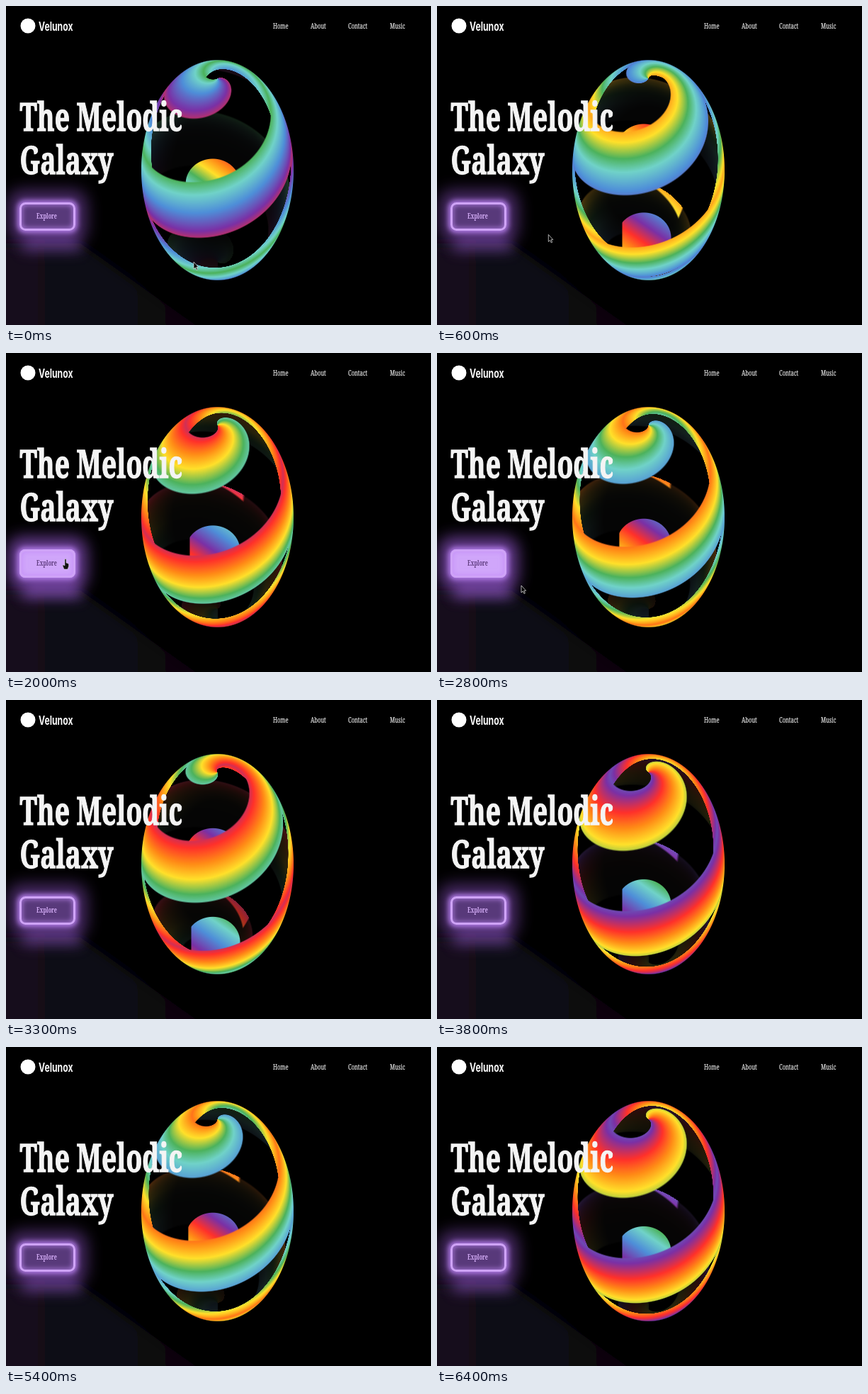
Animation of 600 by 450 pixels, one loop 6.5 s. Source, as an HTML page with a canvas:

```html
<!DOCTYPE html>
<html lang="en">
<head>
<meta charset="utf-8">
<title>Velunox</title>
<style>
  html, body { margin: 0; width: 100%; height: 100%; overflow: hidden; background: #000; }
  canvas, svg { position: absolute; left: 0; top: 0; width: 100%; height: 100%; display: block; }
  .serif { font-family: "Noto Serif", serif; }
  .title { font-size: 54px; font-weight: 700; fill: #f4f4f4; stroke: #f4f4f4; stroke-width: 1.4px; }
  .nav { font-size: 10.5px; font-weight: 500; fill: #e4e4e4; stroke: #e4e4e4; stroke-width: .25px; }
  .brand { font: 700 17px Inter, sans-serif; fill: #fafafa; }
  .explore { font-size: 10.5px; font-weight: 700; }
</style>
</head>
<body>
<canvas id="stage" width="600" height="450"></canvas>
<svg viewBox="0 0 600 450" preserveAspectRatio="none">
  <defs>
    <filter id="soft" x="-60%" y="-100%" width="220%" height="300%"><feGaussianBlur stdDeviation="3.5"/></filter>
    <filter id="wide" x="-80%" y="-150%" width="260%" height="400%"><feGaussianBlur stdDeviation="11"/></filter>
    <filter id="pool" x="-60%" y="-150%" width="220%" height="400%"><feGaussianBlur stdDeviation="9"/></filter>
    <linearGradient id="floor" x1="0" y1="0" x2="1" y2="0">
      <stop offset="0" stop-color="#140d1d"/>
      <stop offset=".5" stop-color="#0f0a15"/>
      <stop offset="1" stop-color="#050308"/>
    </linearGradient>
    <clipPath id="inside"><rect x="19" y="277" width="79" height="40" rx="8"/></clipPath>
  </defs>

  <path d="M-30 335H105L310 480H-30Z" fill="url(#floor)" filter="url(#pool)"/>
  <path id="mirror" d="M30 318H96L108 347H22Z" fill="#7b4bab" filter="url(#pool)"/>
  <rect id="halo" x="3" y="260" width="111" height="74" rx="18" fill="#7d48ae" filter="url(#wide)"/>
  <rect x="16" y="274" width="85" height="46" rx="11" fill="#b07ae6" filter="url(#soft)"/>
  <rect id="face" x="19" y="277" width="79" height="40" rx="8"/>
  <g clip-path="url(#inside)">
    <rect x="20" y="278" width="77" height="38" rx="8" fill="none" stroke="#c48cf8" stroke-width="6" stroke-opacity=".8" filter="url(#soft)"/>
  </g>
  <rect x="20.5" y="278.5" width="76" height="37" rx="7" fill="none" stroke="#cfa3f7" stroke-width="3"/>
  <text id="label" class="serif explore" transform="translate(43 300) scale(.69 1)">Explore</text>

  <circle cx="31" cy="28" r="10.5" fill="#fff"/>
  <text class="brand" transform="translate(46 35) scale(.72 1)">Velunox</text>
  <g class="serif nav">
    <text transform="translate(377 32) scale(.72 1)">Home</text>
    <text transform="translate(430 32) scale(.72 1)">About</text>
    <text transform="translate(483 32) scale(.72 1)">Contact</text>
    <text transform="translate(542 32) scale(.72 1)">Music</text>
  </g>
  <g class="serif title">
    <text transform="translate(19.5 176) scale(.69 1)">The Melodic</text>
    <text transform="translate(19.5 237) scale(.69 1)">Galaxy</text>
  </g>

  <path id="arrow" d="M0 0V10L2.3 8L4 11.5L5.4 10.8L3.8 7.3H6.6Z" fill="#000" stroke="#d8d8d8" stroke-width=".8"/>
  <path id="hand" d="M-1-7Q0-8 1-7V-2L4-1Q5 0 4.5 3L3 7H-2L-4 2Q-4 0-1 2Z" fill="#111" stroke="#ddd" stroke-width=".5"/>
</svg>
<script>
const LOOP = 6500, STEP = 100, SPIN = 866.67;
const $ = id => document.getElementById(id);
const clamp = (v, lo = 0, hi = 1) => Math.min(hi, Math.max(lo, v));
const fract = v => v - Math.floor(v);
const ctx = $("stage").getContext("2d");

// Ellipsoid with its pole tilted towards the viewer.
const CX = 298.5, CY = 231.5, RX = 108, RY = 156;
const X0 = 188, Y0 = 73, W = 221, H = 318;
const TILT = 56 * Math.PI / 180, PS = Math.sin(TILT), PC = Math.cos(TILT);
const TOP = 61, PITCH = 63;

const STOPS = [
  [0, 122, 48, 165], [.16, 255, 48, 42], [.29, 255, 138, 22], [.42, 255, 224, 42],
  [.55, 76, 178, 92], [.66, 112, 210, 200], [.82, 78, 142, 216], [1, 122, 48, 165]
];
const N = 512;
const hues = Array.from({ length: N }, (_, i) => {
  const u = i / N, k = STOPS.findIndex(s => s[0] > u);
  const a = STOPS[k - 1], b = STOPS[k], m = (u - a[0]) / (b[0] - a[0]);
  return [1, 2, 3].map(j => a[j] + (b[j] - a[j]) * m);
});
const hue = u => hues[Math.floor(fract(u) * N) % N];
// Colour across the ribbon; the whole scale cycles twice per spin.
const ribbonHue = (s, p) => hue(.55 + .52 * Math.abs(s) - 2 * p);

// Base spiral coordinate and turn around the axis for a surface point.
function surface(x, y, z) {
  const c = Math.acos(clamp(-PS * y + PC * z, -1, 1)) * 180 / Math.PI;
  const turn = fract(Math.atan2(-x, PC * y + PS * z) / (2 * Math.PI));
  const bent = c + 8 * Math.exp(-((c / 38) ** 2));
  return { g: (bent - TOP) / PITCH - turn, turn };
}

const cells = [];
for (let j = 0; j < H; j++) for (let i = 0; i < W; i++) {
  const px = X0 + i + .5, py = Y0 + j + .5;
  const x = (px - CX) / RX, y = (py - CY) / RY, r = Math.hypot(x, y);
  if (r >= 1) continue;
  const z = Math.sqrt(1 - r * r);
  cells.push({
    at: (j * W + i) * 4, px, py, z,
    cover: clamp((1 - r) * 115),
    rim: .5 * clamp((.52 - z) / .25),
    front: surface(x, y, z), back: surface(x, y, -z)
  });
}

function dome(px, py, p) {
  if (p < -.5) return null;
  const top = 215 + 125 * p, left = 253 + 8 * clamp(p / .3);
  const dx = (px - 292) / 39, dy = (py - top - 36) / 36;
  const a = clamp((1 - Math.hypot(dx, dy)) * 36) * clamp(px - left);
  if (!a) return null;
  return [a, hue(.3 - 2.3 * p - .3 * (px - 290) / 70 + .25 * (py - top) / 40)];
}

function inner(cell, p) {
  const { z, back: { g, turn } } = cell;
  const lap = Math.floor(g - p), f = g - p - lap;
  const out = [0, 0, 0];
  if (f < .5 || lap > 0) {
    const s = Math.min(1, f * 2), c = ribbonHue(s, p);
    const fade = lap > 0 ? 1 : clamp(f * 60) * clamp((.5 - f) * 60);
    let k = fade * .25 * clamp(1.1 - z * 1.35);
    if (lap <= 0) k += fade * .17 * Math.exp(-s * 7);
    // Lit sliver on the far side of the ribbon.
    const tip = .53 + .15 * p;
    if (lap === 0 && turn > .48 && turn < tip) {
      const lit = clamp(p * 7) * clamp((.85 - p) * 5);
      k = Math.max(k, lit * clamp((1.6 * (turn - .48) - s) * 25) * clamp((tip - turn) * 150));
    }
    for (let n = 0; n < 3; n++) out[n] = c[n] * k + 5 * fade;
  }
  for (const q of [p, p - 1]) {
    const d = dome(cell.px, cell.py, q);
    if (d) for (let n = 0; n < 3; n++) out[n] += (d[1][n] - out[n]) * d[0];
  }
  return out;
}

const img = ctx.createImageData(W, H), data = img.data;
function drawEgg(p) {
  for (const cell of cells) {
    const { front, rim, at } = cell;
    const f = fract(front.g - p);
    const s = f < .5 ? f * 2 : (f - 1) * 2;
    const edge = f < .5 ? Math.min(f + rim, .5 - f) : Math.max(f - 1 + rim, .5 - f);
    const a = rim >= .5 ? 1 : clamp(edge * PITCH / .8 + .5);
    const c = ribbonHue(s, p);
    const b = a < 1 ? inner(cell, p) : c;
    for (let n = 0; n < 3; n++) data[at + n] = b[n] + (c[n] - b[n]) * a;
    data[at + 3] = 255 * cell.cover;
  }
  ctx.clearRect(0, 0, 600, 450);
  ctx.putImageData(img, X0, Y0);
}

// Pointer stops: time, x, y.
const PATH = [[0, 265, 361], [200, 255, 355], [900, 84, 298], [2300, 84, 298],
  [2800, 119, 328], [3000, 150, 345], [3300, 300, 300]];
function pointer(t) {
  const k = PATH.findIndex(s => s[0] > t);
  if (k < 1) return null;
  const a = PATH[k - 1], b = PATH[k], m = (t - a[0]) / (b[0] - a[0]);
  return [a[1] + (b[1] - a[1]) * m, a[2] + (b[2] - a[2]) * m];
}

const mix = (a, b, m) => `rgb(${a.map((v, i) => Math.round(v + (b[i] - v) * m))})`;

function drawPage(t) {
  const h = clamp((t - 700) / 600) * clamp((3300 - t) / 400);
  $("face").setAttribute("fill", mix([88, 57, 122], [208, 166, 250], h));
  $("label").setAttribute("fill", mix([211, 172, 246], [96, 62, 128], h));
  $("halo").setAttribute("opacity", .6 + .25 * h);
  $("mirror").setAttribute("opacity", .5 + .2 * h);

  const pos = pointer(t), over = t >= 800 && t < 2500;
  for (const id of ["arrow", "hand"]) {
    const on = pos && (id === "hand") === over;
    $(id).setAttribute("visibility", on ? "visible" : "hidden");
    if (on) $(id).setAttribute("transform", `translate(${pos})`);
  }
}

let shown = -1;
function render(now) {
  const t = Math.floor(now % LOOP / STEP) * STEP;
  if (t !== shown) {
    shown = t;
    drawEgg(fract(Math.max(0, t / SPIN - .085)));
    drawPage(t);
  }
}

const start = performance.now();
function tick() {
  render(performance.now() - start);
  requestAnimationFrame(tick);
}
tick();
</script>
</body>
</html>
```
